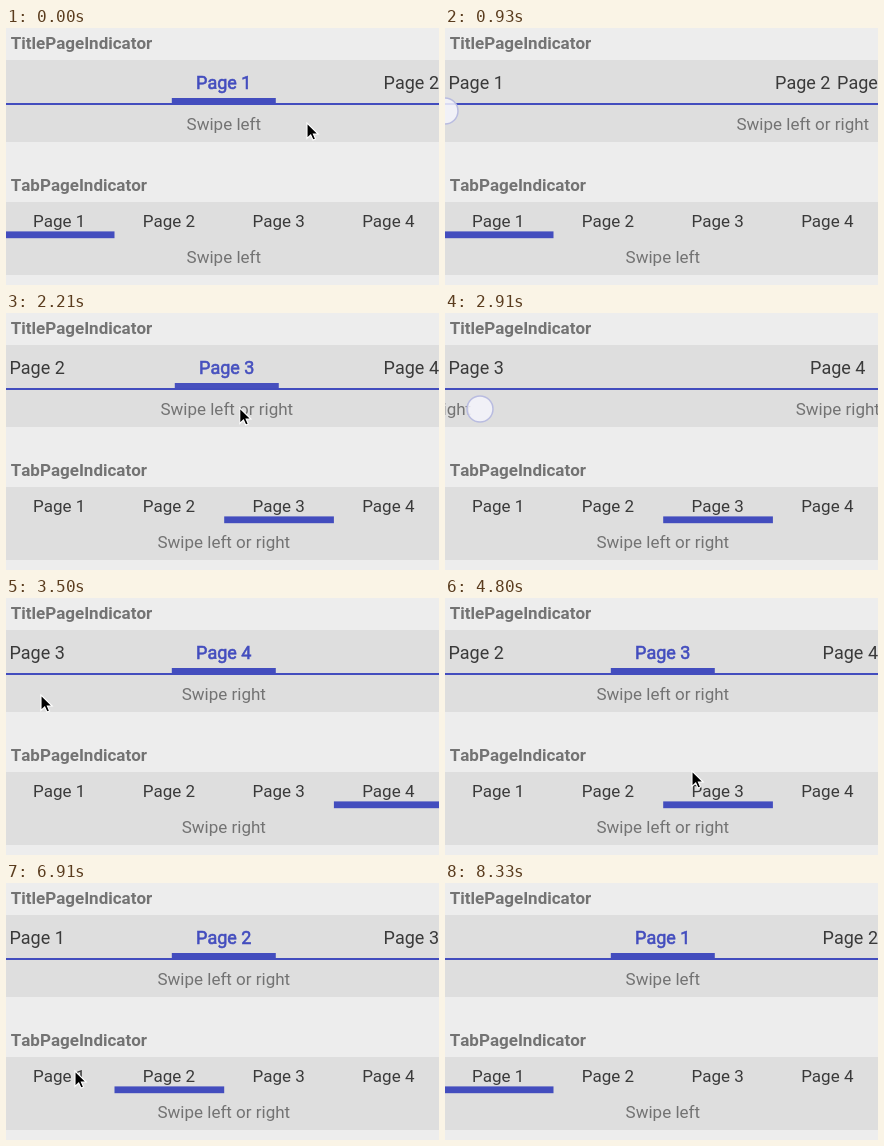
An HTML page with a canvas that plays this animation: 433x257 px, repeating every 8930 ms.

```html
<!DOCTYPE html>
<html lang="en">
<head>
<meta charset="utf-8">
<title>Page indicators</title>
<style>
  html, body { margin: 0; width: 100%; height: 100%; overflow: hidden; background: #ededed; }
  canvas { display: block; }
</style>
</head>
<body>
<canvas id="stage" width="433" height="257"></canvas>
<script>
const ctx = document.getElementById('stage').getContext('2d');
const W = 433, H = 257, MID = 217.8, LOOP = 8930, STEP = 116.9;
const BLUE = '#434dbe', DARK = '#3a3a3a', GRAY = '#737373';
const TITLES = [1, 2, 3, 4].map(n => `Page ${n}`);
const HINTS = ['Swipe left', 'Swipe left or right', 'Swipe left or right', 'Swipe right'];

// Those with a page are swipes or taps.
const ACTIONS = [
  { from: 2, to: 8, x: 0, y: 83, page: 1 },
  { from: 8, to: 13, x: 301, y: 94 },
  { from: 13, to: 16, x: 32, y: 94, page: 2 },
  { from: 16, to: 22, x: 301, y: 94 },
  { from: 22, to: 25, x: 35, y: 96, page: 3 },
  { from: 30, to: 36, x: 264, y: 198 },
  { from: 38, to: 38, x: 264, y: 198, page: 2 },
  { from: 39, to: 41, x: 247, y: 172 },
  { from: 42, to: 49, x: 44, y: 59 },
  { from: 51, to: 51, x: 44, y: 59, page: 1 },
  { from: 53, to: 59, x: 69, y: 187 },
  { from: 60, to: 60, x: 69, y: 187, page: 0 },
  { from: 67, to: 71, x: 267, y: 262 }
];
const SWIPE_SETTLE = 5.4, TAP_SETTLE = 2, TOUCH_SLOP = 8;

const mix = (a, b, u) => a + (b - a) * u;
const easeOut = (u, power) => 1 - (1 - Math.min(1, u)) ** power;

function stateAt(k) {
  let x = 301, y = 94, page = 0, tabPage = 0, selected = 0, pressed = false;
  for (const act of ACTIONS) {
    if (k < act.from) break;
    const tap = act.from === act.to, turns = 'page' in act;
    const u = tap ? 1 : Math.min(1, (k - act.from) / (act.to - act.from));
    const moved = turns ? u * u : easeOut(u, 2);
    const startX = x;
    x = mix(x, act.x, moved);
    y = mix(y, act.y, moved);
    if (!turns) continue;
    pressed = k <= act.to;
    page = selected + Math.max(0, startX - x - TOUCH_SLOP) / W;
    if (!pressed) {
      const elapsed = k - act.to;
      page = mix(page, act.page, easeOut(elapsed / (tap ? TAP_SETTLE : SWIPE_SETTLE), 5));
      tabPage = mix(selected, act.page, easeOut(elapsed / TAP_SETTLE, 5));
      selected = act.page;
    }
  }
  return { x, y, page, tabPage, selected, pressed };
}

function rect(x, y, w, h, color) {
  ctx.fillStyle = color;
  ctx.fillRect(x, y, w, h);
}

function text(str, x, y, size, color, align = 'center', weight = 400) {
  ctx.font = `${weight} ${size}px Roboto, sans-serif`;
  ctx.fontKerning = 'none';
  ctx.textAlign = align;
  ctx.fillStyle = color;
  ctx.fillText(str, x, y);
}

function hints(page, y) {
  HINTS.forEach((hint, i) => text(hint, MID + (i - page) * W, y, 17, GRAY));
}

// Left edges of the titles: clipped to the sides and pushed apart.
function titleEdges(page, width) {
  const min = 3.4, max = W - width, gap = width + 6.6;
  const current = Math.floor(page);
  const x = TITLES.map((_, i) => {
    const left = MID - width / 2 + (i - page) * W;
    return i <= current ? Math.max(min, left) : Math.min(max, left);
  });
  for (let i = current - 1; i >= 0; i--) x[i] = Math.min(x[i], x[i + 1] - gap);
  for (let i = current + 1; i < x.length; i++) x[i] = Math.max(x[i], x[i - 1] + gap);
  return x;
}

function titleStrip(page) {
  ctx.font = '400 18px Roboto, sans-serif';
  ctx.fontKerning = 'none';
  const width = ctx.measureText(TITLES[0]).width, baseline = 61;
  const nearest = Math.round(page), distance = Math.abs(page - nearest);
  const glow = Math.max(0, 1 - distance / .25);
  rect(0, 75, W, 2, BLUE);
  titleEdges(page, width).forEach((x, i) => {
    const strength = i === nearest ? glow : 0;
    ctx.globalAlpha = 1 - strength;
    text(TITLES[i], x, baseline, 18, DARK, 'left');
    ctx.globalAlpha = strength;
    text(TITLES[i], x, baseline, 18, BLUE, 'left');
    rect(x - 24.3, 70, width + 48.6, 5, BLUE);
    if (distance <= .05) {
      ctx.strokeStyle = BLUE;
      ctx.lineWidth = .6;
      ctx.strokeText(TITLES[i], x, baseline);
    }
    ctx.globalAlpha = 1;
  });
}

function tabStrip(selected) {
  const tab = 109.7;
  rect(selected * tab - 1.2, 203.4, tab, 6.8, BLUE);
  TITLES.forEach((title, i) => text(title, 53.2 + i * tab, 199, 17, DARK));
}

const ARROW = new Path2D('M0 1V16.5L3.7 13 6 18 8.6 17 6.4 12H11.2Z');

function pointer({ x, y, pressed }) {
  ctx.save();
  ctx.translate(x, y);
  if (pressed) {
    ctx.beginPath();
    ctx.arc(0, 0, 13, 0, 2 * Math.PI);
    ctx.fillStyle = 'rgba(245,245,252,.85)';
    ctx.strokeStyle = '#b9bce0';
    ctx.lineWidth = 1.5;
    ctx.fill();
    ctx.stroke();
  } else {
    ctx.fillStyle = '#000';
    ctx.strokeStyle = '#fff';
    ctx.lineWidth = 1.1;
    ctx.fill(ARROW);
    ctx.stroke(ARROW);
  }
  ctx.restore();
}

function draw(now) {
  const state = stateAt(Math.floor((now % LOOP + 18) / STEP));
  rect(0, 0, W, H, '#ededed');
  rect(0, 32, W, 82, '#dedede');
  rect(0, 174, W, 73, '#dedede');
  text('TitlePageIndicator', 4.7, 21, 17, GRAY, 'left', 700);
  text('TabPageIndicator', 4.7, 163, 17, GRAY, 'left', 700);
  titleStrip(state.page);
  hints(state.page, 102);
  tabStrip(state.selected);
  hints(state.tabPage, 235);
  pointer(state);
}

function loop() {
  draw(performance.now());
  requestAnimationFrame(loop);
}
loop();
</script>
</body>
</html>
```
